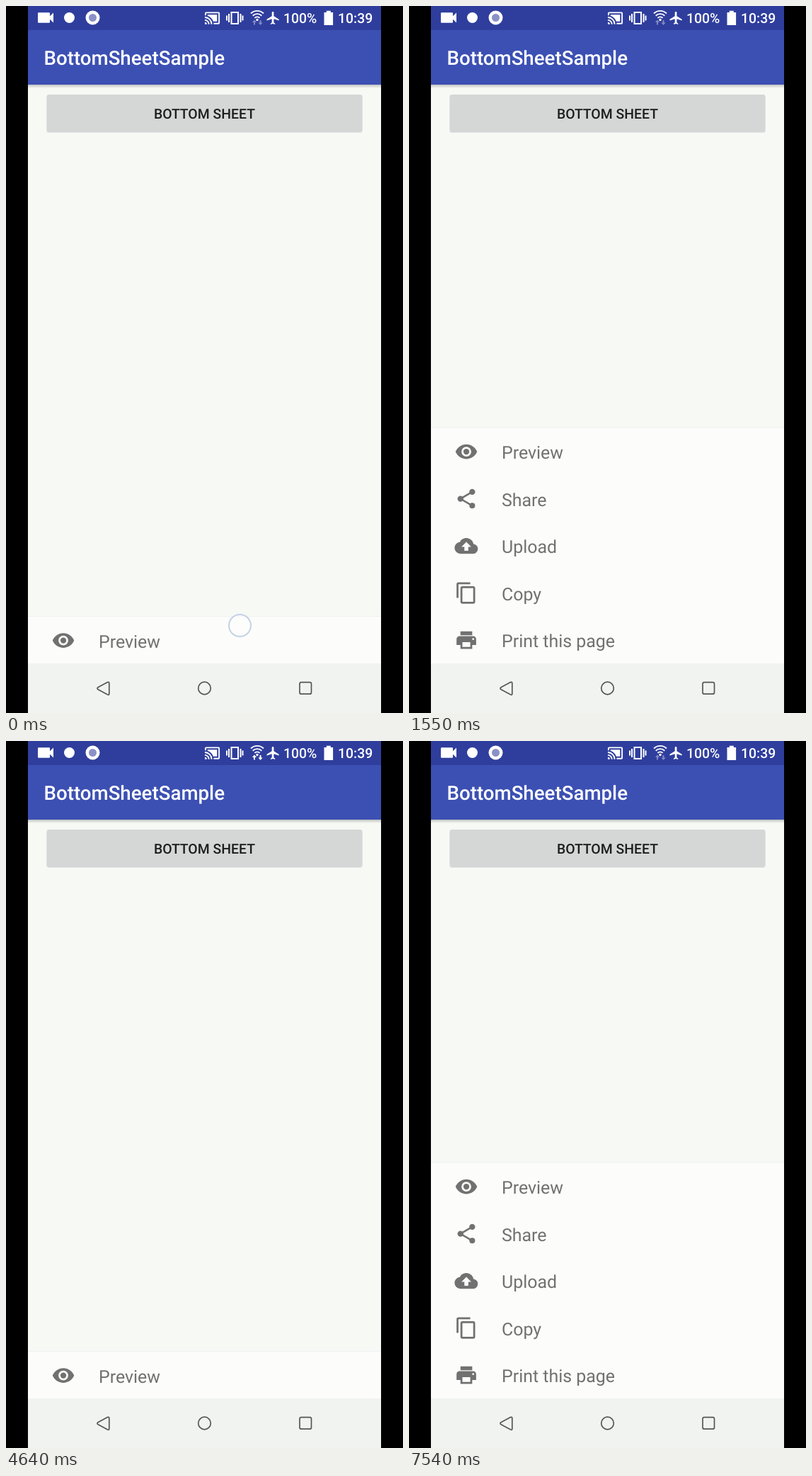
Recreate the animation shown at these times as an HTML page. Size 561x998 px, loop 8 s.

```html
<!DOCTYPE html>
<html lang="en">
<head>
<meta charset="utf-8">
<title>Bottom sheet</title>
<style>
  html, body { margin: 0; width: 100%; height: 100%; overflow: hidden; background: #000; }
  svg { display: block; width: 100vw; height: 100vh; font-family: Roboto, sans-serif; text-rendering: geometricPrecision; }
  .line { fill: none; stroke: #fff; }
  .medium { font-weight: 500; }
</style>
</head>
<body>
<svg viewBox="0 0 561 998">
  <defs>
    <linearGradient id="shade" x2="0" y2="1">
      <stop stop-color="#000" stop-opacity=".22"/>
      <stop offset="1" stop-color="#000" stop-opacity="0"/>
    </linearGradient>
    <g id="eye">
      <path fill-rule="evenodd" d="M12 4.5C7 4.5 2.73 7.61 1 12c1.73 4.39 6 7.5 11 7.5s9.27-3.11 11-7.5c-1.73-4.39-6-7.5-11-7.5zM7 12a5 5 0 0 1 10 0a5 5 0 0 1-10 0z"/>
      <circle cx="12" cy="12" r="3"/>
    </g>
    <g id="share">
      <path d="M18 5L6 12l12 7" fill="none" stroke="#717171" stroke-width="1.8"/>
      <circle cx="18" cy="5" r="3"/><circle cx="6" cy="12" r="3"/><circle cx="18" cy="19" r="2.92"/>
    </g>
    <path id="upload" d="M19.35 10.04C18.67 6.59 15.64 4 12 4 9.11 4 6.6 5.64 5.35 8.04 2.34 8.36 0 10.91 0 14a6 6 0 0 0 6 6h13a5 5 0 0 0 .35-9.96zM14 13v4h-4v-4H7l5-5 5 5z"/>
    <g id="copy" fill="none" stroke="#717171" stroke-width="2">
      <path d="M16 2H4a1 1 0 0 0-1 1v14"/>
      <rect x="7" y="6" width="13" height="16" rx="1"/>
    </g>
    <path id="print" fill-rule="evenodd" d="M19 8H5a3 3 0 0 0-3 3v6h4v4h12v-4h4v-6a3 3 0 0 0-3-3zM16 19H8v-5h8zM18 11a1 1 0 0 1 2 0a1 1 0 0 1-2 0zM18 3H6v4h12z"/>
  </defs>

  <rect width="561" height="998"/>
  <rect x="31" width="499" height="998" fill="#f7f9f5"/>

  <rect x="31" y="111" width="499" height="5" fill="url(#shade)"/>
  <rect x="31" width="499" height="111" fill="#3c50b3"/>
  <rect x="31" width="499" height="34" fill="#2f3e9d"/>
  <text class="medium" x="53.5" y="82.8" font-size="27.7" fill="#fff">BottomSheetSample</text>

  <rect x="57" y="125" width="447" height="54" rx="4" fill="#dfe3e6"/>
  <rect x="58" y="125" width="445" height="53" rx="3" fill="#d5d7d6"/>
  <text class="medium" x="280.5" y="159" font-size="19.4" text-anchor="middle" fill="#1c1d1c">BOTTOM SHEET</text>

  <g fill="#fff">
    <path d="M46 9.3h15a1 1 0 0 1 1 1v4l5-4.7v13.8l-5-4.7v4a1 1 0 0 1-1 1H46a1 1 0 0 1-1-1V10.3a1 1 0 0 1 1-1z"/>
    <circle cx="89.5" cy="16.5" r="7.5"/>
    <circle cx="122.5" cy="16.5" r="10"/>
    <circle cx="122.5" cy="16.5" r="5.5" fill="#8a91c6"/>
    <g transform="translate(280 5.5) scale(.96)">
      <path class="line" stroke-width="2" d="M2 8V5a1 1 0 0 1 1-1h18a1 1 0 0 1 1 1v14a1 1 0 0 1-1 1h-7M1 15a6 6 0 0 1 6 6M1 11a10 10 0 0 1 10 10"/>
      <path d="M1 18v3h3a3 3 0 0 0-3-3zM19 7H5v1.63c3.96 1.28 7.09 4.41 8.37 8.37H19z"/>
    </g>
    <path class="line" stroke-width="2" d="M318.5 9h9.5v16h-9.5zM315 11v12M312 13.5v7M331.500 11v12M334.500 13.500v7"/>
    <path class="line" stroke-width="1.9" d="M346 10.500a13 13 0 0 1 18 0M348.700 13.700a9 9 0 0 1 12.600 0M351.400 16.900a5.200 5.200 0 0 1 7.200 0"/>
    <circle cx="355" cy="19.500" r="1.700"/>
    <path id="data" d="M351 19.500l3.200 3.500h-2.200v3.500h-2V23h-2.200zM359.500 27l-3.200-3.500h2.200V20h2v3.500h2.200z"/>
    <path transform="translate(366.700 6.200) scale(.9)" d="M21 16v-2l-8-5V3.500a1.500 1.500 0 0 0-3 0V9l-8 5v2l8-2.500V19l-2 1.500V22l3.500-1 3.500 1v-1.500L13 19v-5.500z"/>
    <path d="M449.500 9h3.300V6.700h6V9h3.300v18h-12.600z"/>
    <g class="medium" font-size="19.400">
      <text x="392" y="24">100%</text>
      <text x="469" y="24">10:39</text>
    </g>
  </g>

  <g id="sheet" font-size="24.92" fill="#717171">
    <rect x="31" y="-1" width="499" height="2" fill="#eef1f2"/>
    <rect x="31" width="499" height="334" fill="#fcfdfb"/>
  </g>

  <rect x="31" y="928" width="499" height="70" fill="#f0f3f0"/>
  <g fill="none" stroke="#555756" stroke-width="1.7" stroke-linejoin="round">
    <path d="M130 961.800L143.500 954.600q2.300-1 2.300 1.300v14.800q0 2.300-2.300 1.300L130 964.800q-2-1.500 0-3z"/>
    <circle cx="280.500" cy="963" r="8.800"/>
    <rect x="415" y="954.700" width="16.500" height="16.500" rx="2.300"/>
  </g>
  <circle id="touch" r="15.500" fill="#fff" fill-opacity=".4" stroke="#c6d1e5" stroke-width="2"/>
</svg>
<script>
const LOOP = 8000, LOW = 862, HIGH = 595.5, ROW = 66.5, SLOP = 9;
const el = id => document.getElementById(id);
const sheet = el('sheet'), touch = el('touch'), data = el('data');

const items = [['eye', 'Preview'], ['share', 'Share'], ['upload', 'Upload'],
               ['copy', 'Copy'], ['print', 'Print this page']];
sheet.innerHTML += items.map(([icon, label], i) => `
  <use href="#${icon}" transform="translate(64.4 ${17 + ROW * i}) scale(1.385)"/>
  <text x="131" y="${43.8 + ROW * i}">${label}</text>`).join('');

// Each drag: finger path as [time, x, y], then the sheet settles after release.
const drags = [
  { base: LOW, rest: HIGH, settle: 600,
    path: [[0, 330.5, 874.5], [80, 330.5, 874.5], [500, 360, 721.5], [820, 372, 650], [920, 372, 650]] },
  { base: HIGH, rest: LOW, settle: 320,
    path: [[2480, 318, 638.5], [2900, 325, 721.5], [3000, 325, 721.5], [4020, 345, 880], [4120, 345, 880]] },
  { base: LOW, rest: HIGH, settle: 600,
    path: [[6090, 345, 910.5], [6700, 385, 666], [6800, 385, 666], [6840, 386, 658], [6940, 386, 658]] }
];

function fingerAt(path, t) {
  const i = path.findIndex(p => p[0] > t);
  const [t0, x0, y0] = path[i - 1], [t1, x1, y1] = path[i];
  const k = (t - t0) / (t1 - t0);
  return [x0 + (x1 - x0) * k, y0 + (y1 - y0) * k];
}

function dragged(drag, y) {
  const d = y - drag.path[0][2];
  const top = drag.base + Math.sign(d) * Math.max(0, Math.abs(d) - SLOP);
  return Math.min(LOW, Math.max(HIGH, top));
}

function draw(now) {
  const t = now % LOOP;
  const drag = drags.filter(d => d.path[0][0] <= t).pop();
  const [end, , endY] = drag.path[drag.path.length - 1];
  const held = t < end;
  let top;
  if (held) {
    const [x, y] = fingerAt(drag.path, t);
    top = dragged(drag, y);
    touch.setAttribute('transform', `translate(${x} ${y})`);
  } else {
    const k = Math.min(1, (t - end) / drag.settle);
    top = drag.rest + (dragged(drag, endY) - drag.rest) * (1 - k) ** 5;
  }
  touch.setAttribute('visibility', held ? 'visible' : 'hidden');
  sheet.setAttribute('transform', `translate(0 ${top})`);
  data.setAttribute('fill', t >= 4640 && t < 7300 ? '#fff' : '#8189c3');
  requestAnimationFrame(() => draw(performance.now() - start));
}
const start = performance.now();
draw(0);
</script>
</body>
</html>
```
